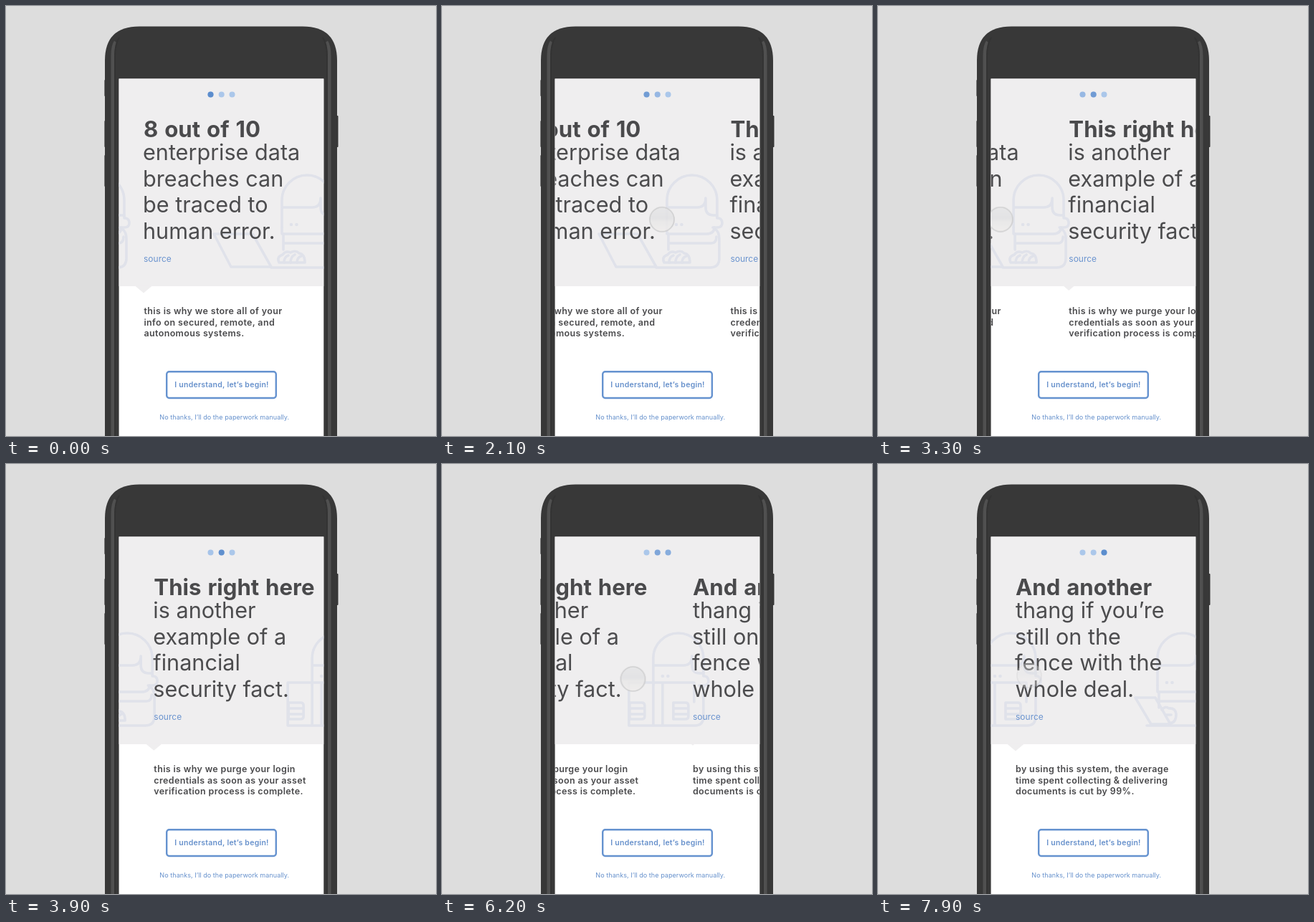
Write an HTML page that moves like this. It is 600 px wide and 600 px high and loops after 8000 ms.

```html
<!DOCTYPE html>
<html lang="en">
<head>
<meta charset="utf-8">
<title>Onboarding carousel</title>
<style>
  /* --p: carousel position in pages; --x: where the current touch began */
  @property --p { syntax: "<number>"; inherits: true; initial-value: 0; }
  @property --x { syntax: "<number>"; inherits: true; initial-value: 384.5; }

  html, body { margin: 0; width: 100%; height: 100%; overflow: hidden; background: #ddd; }
  svg {
    display: block; width: 100vw; height: 100vh;
    font-family: Inter, Roboto, sans-serif;
    animation: swipe 8s linear infinite;
  }
  .pages { transform: translateX(calc(var(--p) * -288px)); }
  .art {
    transform: translateX(calc(var(--p) * -264px));
    fill: none; stroke: #e0e2ea; stroke-width: 3.6;
    stroke-linecap: round; stroke-linejoin: round;
  }
  .eye { fill: #e0e2ea; stroke: none; }

  .big { font-size: 30.6px; fill: #4c4c4e; }
  .bold { font-size: 31.2px; font-weight: 700; word-spacing: 1.5px; fill: #4a4a4c; }
  .small { font-size: 12.5px; font-weight: 600; letter-spacing: .35px; fill: #4a4a4c; }
  .link { font-size: 12px; fill: #6b94cf; }
  .begin { font-size: 10.5px; font-weight: 600; letter-spacing: .25px; fill: #6690cb; }
  .skip { font-size: 9.05px; letter-spacing: .045px; fill: #6590cc; }

  .item { --d: max(var(--p) - var(--i), var(--i) - var(--p)); }
  .notch { fill: #efeeef; transform: scale(max(0, 1 - 1.4 * var(--d))); }
  .dot { fill: #5c8dcd; opacity: max(0, 1 - var(--d)); }

  .touch {
    transform: translate(calc((var(--x) - 288 * var(--p)) * 1px),
      calc(295px + 5px * sin(var(--p) * 180deg) * sin(var(--p) * 180deg)));
    animation: start 8s step-end infinite, press 8s linear infinite;
  }

  @keyframes swipe {
    0% { --p: 0; }
    18.125% { --p: 0; animation-timing-function: cubic-bezier(.5, 0, .8, .7); }
    22.5% { --p: .109; }
    26.25% { --p: .269; }
    35% { --p: .524; }
    42.5% { --p: .785; }
    48.75% { --p: .95; animation-timing-function: ease-out; }
    54.4% { --p: 1; }
    63.125% { --p: 1; animation-timing-function: cubic-bezier(.5, 0, .8, .7); }
    67.5% { --p: 1.109; }
    71.25% { --p: 1.269; }
    80% { --p: 1.524; }
    87.5% { --p: 1.785; }
    93.75% { --p: 1.95; animation-timing-function: ease-out; }
    98.5%, 100% { --p: 2; }
  }
  @keyframes start {
    0% { --x: 384.5; }
    55% { --x: 684.5; }
    94%, 100% { --x: 787; }
  }
  @keyframes press {
    0%, 14.4% { opacity: 0; }
    17.5%, 42.5% { opacity: 1; }
    45.6%, 59.4% { opacity: 0; }
    62.5%, 87.5% { opacity: 1; }
    90.6%, 96.9% { opacity: 0; }
    100% { opacity: .65; }
  }
</style>
</head>
<body>
<svg viewBox="0 0 600 600">
  <defs>
    <clipPath id="screen"><rect x="157.6" y="101.6" width="285.7" height="499"/></clipPath>
    <linearGradient id="glass" x2="0" y2="1">
      <stop offset="0" stop-color="#e6e6e7" stop-opacity=".9"/>
      <stop offset=".45" stop-color="#e2e2e4" stop-opacity=".9"/>
      <stop offset=".6" stop-color="#e9e8e8" stop-opacity=".9"/>
      <stop offset="1" stop-color="#efedec" stop-opacity=".9"/>
    </linearGradient>

    <g id="head">
      <path d="M0 309V271A35 35 0 0 1 70 271V296H72Q77 297 77 303Q77 309 70 309H64"/>
      <path d="M1 281H42Q54 281 54 268V281Q54 292 65 292H70"/>
    </g>
    <g id="eyes" class="eye"><circle cx="13" cy="0" r="2.3"/><circle cx="20.5" cy="0" r="2.3"/></g>
    <g id="seated">
      <use href="#head"/>
      <use href="#eyes" y="305"/>
      <path d="M0 309V318H55Q66 318 66 309"/>
      <path d="M2 318V340M3 331H62Q69 331 69 322M67 311Q73 315 73 325V352Q73 365 60 365H-15"/>
    </g>
    <g id="fingers">
      <path d="M-4 358Q-8 350 1 347Q5 341 12 344Q19 340 24 345Q32 346 32 358Z"/>
      <path d="M3 358Q3 350 9 348M12 358Q12 350 18 347M21 358Q21 351 27 349"/>
    </g>
    <path id="fist" d="M0 333H17Q21 333 21 337V352Q21 356 17 356H0ZM0 341H20M0 349H20"/>
  </defs>

  <!-- phone -->
  <g fill="#343434">
    <rect x="137.4" y="103" width="4" height="23" rx="1"/>
    <rect x="137.4" y="160" width="4" height="37" rx="1"/>
    <rect x="137.4" y="208" width="4" height="44" rx="1"/>
    <rect x="459" y="153" width="4.5" height="44" rx="1"/>
  </g>
  <path d="M138 600V76Q138 28.4 186 28.4H414Q462 28.4 462 76V600Z" fill="#383838"/>
  <path d="M149 600V70Q149 56 153 50M451 600V70Q451 56 447 50" fill="none" stroke="#505050" stroke-width="5"/>
  <path d="M152 600V70Q152 53 158 44M448 600V70Q448 53 442 44" fill="none" stroke="#333" stroke-width="2"/>

  <g clip-path="url(#screen)">
    <rect x="157" y="101" width="287" height="499" fill="#fff"/>
    <rect x="157" y="101" width="287" height="290" fill="#efeeef"/>

    <g class="art">
      <use href="#seated" x="95"/>
      <g transform="translate(385)">
        <use href="#seated"/>
        <path d="M-95 318H-41L-15 364H-71Z"/>
        <use href="#fingers"/>
      </g>
      <g transform="translate(678)">
        <use href="#head"/>
        <use href="#eyes" y="296"/>
        <path d="M-34 305H57M-34 305V365H58Q70 365 70 352V310M0 305V365M13 305V365M57 305V332"/>
        <use href="#fist" x="-33"/>
        <use href="#fist" x="28"/>
      </g>
      <g transform="translate(918)">
        <use href="#seated"/>
        <path d="M-31 326H-3L18 363H-9Z"/>
        <path d="M6 343Q10 337 16 341Q25 340 26 349Q26 362 16 362M12 350H19"/>
      </g>
    </g>

    <g class="pages">
      <g transform="translate(192)">
        <g transform="translate(0 390.5)"><path class="item notch" style="--i:0" d="M-12 0H12L0 10Z"/></g>
        <text class="bold" y="183">8 out of 10</text>
        <text class="big"><tspan x="-1" y="215">enterprise data</tspan><tspan x="-1" y="251.5">breaches can</tspan><tspan x="-1" y="288">be traced to</tspan><tspan x="-1" y="324.5">human error.</tspan></text>
        <text class="link" y="357">source</text>
        <text class="small"><tspan x=".5" y="430">this is why we store all of your</tspan><tspan x=".5" y="445.5">info on secured, remote, and</tspan><tspan x=".5" y="461">autonomous systems.</tspan></text>
      </g>
      <g transform="translate(480)">
        <g transform="translate(0 390.5)"><path class="item notch" style="--i:1" d="M-12 0H12L0 10Z"/></g>
        <text class="bold" y="183">This right here</text>
        <text class="big"><tspan x="-1" y="215">is another</tspan><tspan x="-1" y="251.5">example of a</tspan><tspan x="-1" y="288">financial</tspan><tspan x="-1" y="324.5">security fact.</tspan></text>
        <text class="link" y="357">source</text>
        <text class="small"><tspan x="0" y="430">this is why we purge your login</tspan><tspan x="0" y="445.5">credentials as soon as your asset</tspan><tspan x="0" y="461">verification process is complete.</tspan></text>
      </g>
      <g transform="translate(768)">
        <g transform="translate(0 390.5)"><path class="item notch" style="--i:2" d="M-12 0H12L0 10Z"/></g>
        <text class="bold" y="183">And another</text>
        <text class="big"><tspan x="0" y="215">thang if you’re</tspan><tspan x="-1" y="251.5">still on the</tspan><tspan x="-1" y="288">fence with the</tspan><tspan x="-.5" y="324.5">whole deal.</tspan></text>
        <text class="link" y="357">source</text>
        <text class="small"><tspan x="0" y="430">by using this system, the average</tspan><tspan x="0" y="445.5">time spent collecting &amp; delivering</tspan><tspan x="0" y="461">documents is cut by 99%.</tspan></text>
      </g>
    </g>

    <g fill="#abc7ea">
      <circle cx="285.5" cy="123.5" r="4"/><circle cx="300.7" cy="123.5" r="4"/><circle cx="315.5" cy="123.5" r="4"/>
    </g>
    <circle class="item dot" style="--i:0" cx="285.5" cy="123.5" r="4"/>
    <circle class="item dot" style="--i:1" cx="300.7" cy="123.5" r="4"/>
    <circle class="item dot" style="--i:2" cx="315.5" cy="123.5" r="4"/>

    <rect x="224.2" y="510.2" width="152.6" height="36.8" rx="3.5" fill="#fff" stroke="#6592cf" stroke-width="2.4"/>
    <text class="begin" x="301" y="531.5" text-anchor="middle">I understand, let’s begin!</text>
    <text class="skip" x="304.8" y="577" text-anchor="middle">No thanks, I’ll do the paperwork manually.</text>

    <g class="touch">
      <circle r="17" fill="url(#glass)" stroke="#cfcfd0" stroke-width="1.7"/>
    </g>
  </g>
</svg>
</body>
</html>
```
